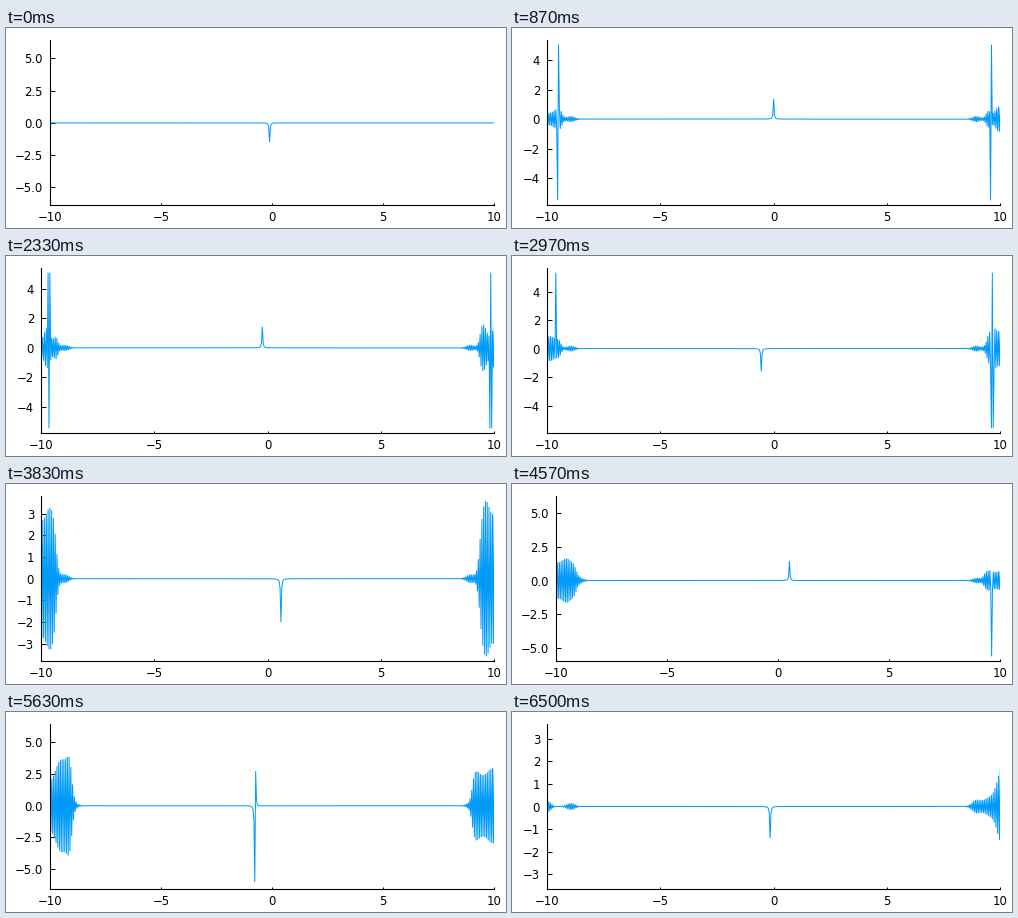
A matplotlib script that plays this animation: 500x200 px, repeating every 6530 ms.

```python
import numpy as np
import matplotlib.pyplot as plt
from matplotlib.animation import FuncAnimation

W, H, DPI = 500, 200, 100
FRAMES, LOOP_MS = 196, 6530
PX = 72 / DPI
CELLS, EDGE = 512, 60
DX = 20 / CELLS
x = np.linspace(-10, 10, CELLS + 1)
depth = np.arange(EDGE) * DX        # distance inward from either end
carrier = (-1.0) ** np.arange(EDGE)

# step, peak centre, peak height, lowest and highest y,
# then amplitude, width and inward growth of the left and right ripples
POSES = np.array([
    (0, -0.11, -1.5, -6.0, 6.06, 0, 0.5, 0, 0, 0.5, 0),
    (50, 0.08, 1.27, -5.1, 4.8, 1.2, 0.8, 0, 1.2, 0.7, 0),
    (89, -0.55, -1.6, -5.6, 5.33, 0.8, 0.6, 0, 1.35, 0.6, 0),
    (114, 0.59, -2.0, -3.58, 3.6, 3.0, 0.68, 0, 3.3, 0.65, 0),
    (137, 0.52, 1.45, -5.65, 5.95, 1.5, 0.9, 0, 0.7, 0.75, 0),
    (169, -0.78, -6.9, -6.2, 6.08, 2.2, 0.95, 0.9, 2.7, 0.98, 0),
    (195, -0.16, -1.4, -3.45, 3.45, 0.25, 0.2, 0, 1.5, 1.4, -2.5),
])


def pose_at(frame):
    """Eased pose, direction of the peak and room for noise (0 at a pose)."""
    steps = POSES[:, 0]
    k = min(np.searchsorted(steps, frame, side="right") - 1, len(steps) - 2)
    u = (frame - steps[k]) / (steps[k + 1] - steps[k])
    s = u * u * (3 - 2 * u)
    a, b = POSES[k, 1:].copy(), POSES[k + 1, 1:].copy()
    sign = np.sign(b[1] if u >= 0.5 else a[1])
    a[1], b[1] = abs(a[1]), abs(b[1])
    return a + (b - a) * s, sign, np.sin(np.pi * u)


def bump(centre, width=0.02):
    return 1 / (1 + ((x - centre) / width) ** 2)


def ripple(amp, width, growth, limits, noise, rng):
    """Alternating ripple at one end; weak ones burst out to the limits."""
    env = amp * np.exp(growth * depth) / (1 + np.exp((depth - width) / 0.06))
    env *= 1 + (0.1 + 0.25 * noise) * np.sin(depth * rng.uniform(5, 14) + rng.uniform(0, 6))
    env += 0.2 * np.tanh(4 * amp) * np.exp(-((depth - 1.05) / 0.25) ** 2)
    y = env * carrier
    if 0.5 < amp < max(np.abs(limits)) / 4:
        start = int(0.4 / DX) + round(5 * noise * rng.uniform(-1, 1))
        for i in range(rng.integers(1, 4)):
            y[start - i] = limits[i % 2]
    return y


def wave(frame):
    pose, sign, noise = pose_at(frame)
    centre, height, lo, hi = pose[:4]
    rng = np.random.default_rng(frame)
    lo, hi = np.array([lo, hi]) * (1 + 0.12 * noise * rng.uniform(-1, 1, 2))

    c = round(centre / DX) * DX
    lobe = 0.85 * max(height - 2, 0)    # tall peaks gain an opposite lobe
    y = sign * (height * bump(c) - lobe * bump(c + DX))
    y[:EDGE] += ripple(*pose[4:7], (hi, lo), noise, rng)
    y[-EDGE:] += ripple(*pose[7:], (lo, hi), noise, rng)[::-1]
    return np.clip(y, lo, hi), lo, hi


def number(v, decimals):
    return f"{v:.{decimals}f}".replace("-", "\u2212")


plt.rcParams["font.family"] = "DejaVu Sans"
fig = plt.figure(figsize=(W / DPI, H / DPI), dpi=DPI, facecolor="white")
ax = fig.add_axes([0, 0, 1, 1])
ax.set_xlim(-10, 10)
ax.set_xticks(range(-10, 11, 5))
ax.spines[["top", "right"]].set_visible(False)
ax.spines[["left", "bottom"]].set_linewidth(1.1 * PX)
ax.tick_params(direction="in", labelsize=8.4, width=PX)
ax.tick_params(axis="x", length=2.5 * PX, pad=6 * PX)
ax.tick_params(axis="y", length=5 * PX, pad=7 * PX)
line, = ax.plot(x, 0 * x, color="#009AFA", lw=PX, solid_joinstyle="bevel")


def update(frame):
    y, lo, hi = wave(frame)
    line.set_ydata(y)
    margin = 0.03 * (hi - lo)
    lo, hi = lo - margin, hi + margin
    span = hi - lo
    step = 1 if span < 9 else 2 if span < 12 else 2.5
    decimals = int(step == 2.5)
    ticks = np.arange(np.ceil(lo / step), np.floor(hi / step) + 1) * step + 0.0
    ax.set_ylim(lo, hi)
    ax.set_yticks(ticks, [number(t, decimals) for t in ticks])
    left = 44 if decimals else 35
    ax.set_position([left / W, (H - 177) / H, (488.3 - left) / W, 165 / H])
    return line,


anim = FuncAnimation(fig, update, frames=FRAMES, interval=LOOP_MS / FRAMES,
                     repeat=True, repeat_delay=0, blit=False)
plt.show()
```
